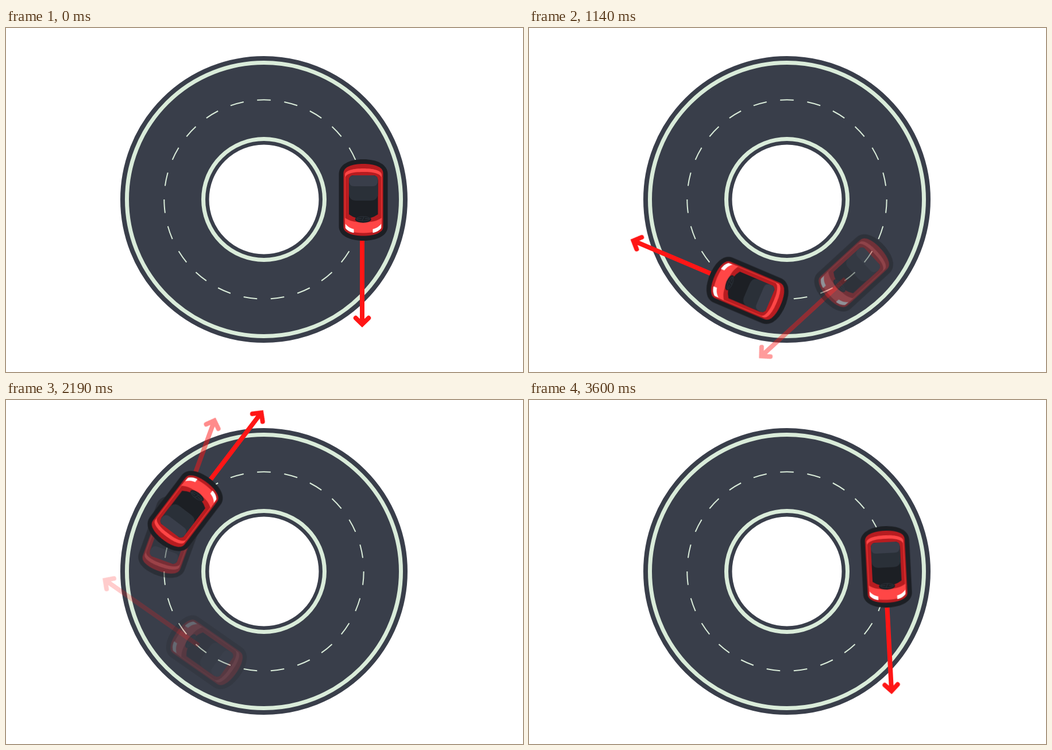
Write an HTML page that moves like this. It is 900x600 px and loops after 3.63 s.

```html
<!DOCTYPE html>
<html lang="en">
<head>
<meta charset="utf-8">
<title>Car on a circular road</title>
<style>
html, body { margin: 0; width: 100%; height: 100%; overflow: hidden; background: #fff; }
svg { display: block; width: 900px; height: 600px; }

.spin { transform-origin: 449px 299px; animation: spin 3630ms steps(121) infinite; }
.ghost { transform-origin: 449px 299px; }
.ghost use { opacity: 0; animation: 3630ms linear infinite; }
.g1 { transform: rotate(47.4deg); }
.g2 { transform: rotate(125deg); }
.g3 { transform: rotate(200deg); }
.g1 use { animation-name: fade1; }
.g2 use { animation-name: fade2; }
.g3 use { animation-name: fade3; }

@keyframes spin { to { transform: rotate(360deg); } }
@keyframes fade1 {
  0%, 13.21% { opacity: 0; }
  13.22%, 29.48% { opacity: .5; }
  43.8%, 100% { opacity: 0; }
}
@keyframes fade2 {
  0%, 34.7% { opacity: 0; }
  34.71%, 52.34% { opacity: .5; }
  66.67%, 100% { opacity: 0; }
}
@keyframes fade3 {
  0%, 55.36% { opacity: 0; }
  55.37%, 64.19% { opacity: .5; }
  78.51%, 100% { opacity: 0; }
}
</style>
</head>
<body>
<svg viewBox="0 0 900 600">
  <defs>
    <g id="arrow" fill="none" stroke="#ff1616" stroke-width="8">
      <path d="M620 318V515"/>
      <path d="M608.8 505.8L620 516.6L631.2 505.8" stroke-linecap="round"/>
    </g>
    <path id="lamp" fill="#fff" d="M590.8 341.5C595 347 600 349.5 605.5 350.8V357.2C599 356 593.5 353 591 349Z"/>
    <g id="car">
      <path fill="#1c1f24" d="M579.5 255C579.5 238 598 229 622 229S664.5 238 664.5 255V346C664.5 362 646 371 622 371S579.5 362 579.5 346Z"/>
      <path fill="#b71c20" d="M587.5 253C587.5 242 603 237 622 237S656.5 242 656.5 253V347C656.5 357 641 362.5 622 362.5S587.5 357 587.5 347Z"/>
      <path fill="#ff4646" d="M590 263V256C590 248 606 245 622 245S654 248 654 256V263C653 254 642 251 622 251S591 254 590 263Z"/>
      <path fill="none" stroke="#e0312f" stroke-width="1.6" d="M590.3 260V335M653.7 260V335"/>
      <path fill="#ff4646" d="M590 331C598 337 609 339 622 339S646 337 654 331V348C650 354 640 357.5 622 357.5S594 354 590 348Z"/>
      <use href="#lamp"/>
      <use href="#lamp" transform="matrix(-1 0 0 1 1244 0)"/>
      <path fill="#1c1f24" d="M597 266Q597 257 606 257H638Q647.5 257 647.5 266V325Q636 333 622 333T597 325Z"/>
      <path fill="#2a3038" d="M597 266Q597 257 606 257H638Q647.5 257 647.5 266V290Q646 301 635 301H609Q598 301 597 290Z"/>
      <path fill="#393e4a" d="M597 266Q597 257 606 257H638Q647.5 257 647.5 266Q647 276 638 276H606Q597 276 597 266Z"/>
      <ellipse cx="621.7" cy="333.7" rx="14" ry="6" fill="#1c1f24"/>
      <ellipse cx="621.7" cy="332.7" rx="11.5" ry="3.8" fill="none" stroke="#2a3038" stroke-width="1.2"/>
      <path stroke="#2a3038" stroke-width="1.6" d="M611 332.5H619M625 332.5H632M623 329.5L620 336"/>
    </g>
  </defs>

  <g fill="none" stroke="#daecda">
    <circle cx="449" cy="299" r="172.75" stroke="#393e4a" stroke-width="154.5"/>
    <circle cx="449" cy="299" r="238.5" stroke-width="7"/>
    <circle cx="449" cy="299" r="105.5" stroke-width="7"/>
    <circle cx="449" cy="299" r="173.7" stroke-width="2" pathLength="46" stroke-dasharray="1 1" transform="rotate(-93.913 449 299)"/>
  </g>

  <g class="ghost g1"><use href="#arrow"/><use href="#car"/></g>
  <g class="ghost g2"><use href="#arrow"/><use href="#car"/></g>
  <g class="ghost g3"><use href="#arrow"/><use href="#car"/></g>
  <g class="spin"><use href="#arrow"/><use href="#car"/></g>
</svg>
</body>
</html>
```
